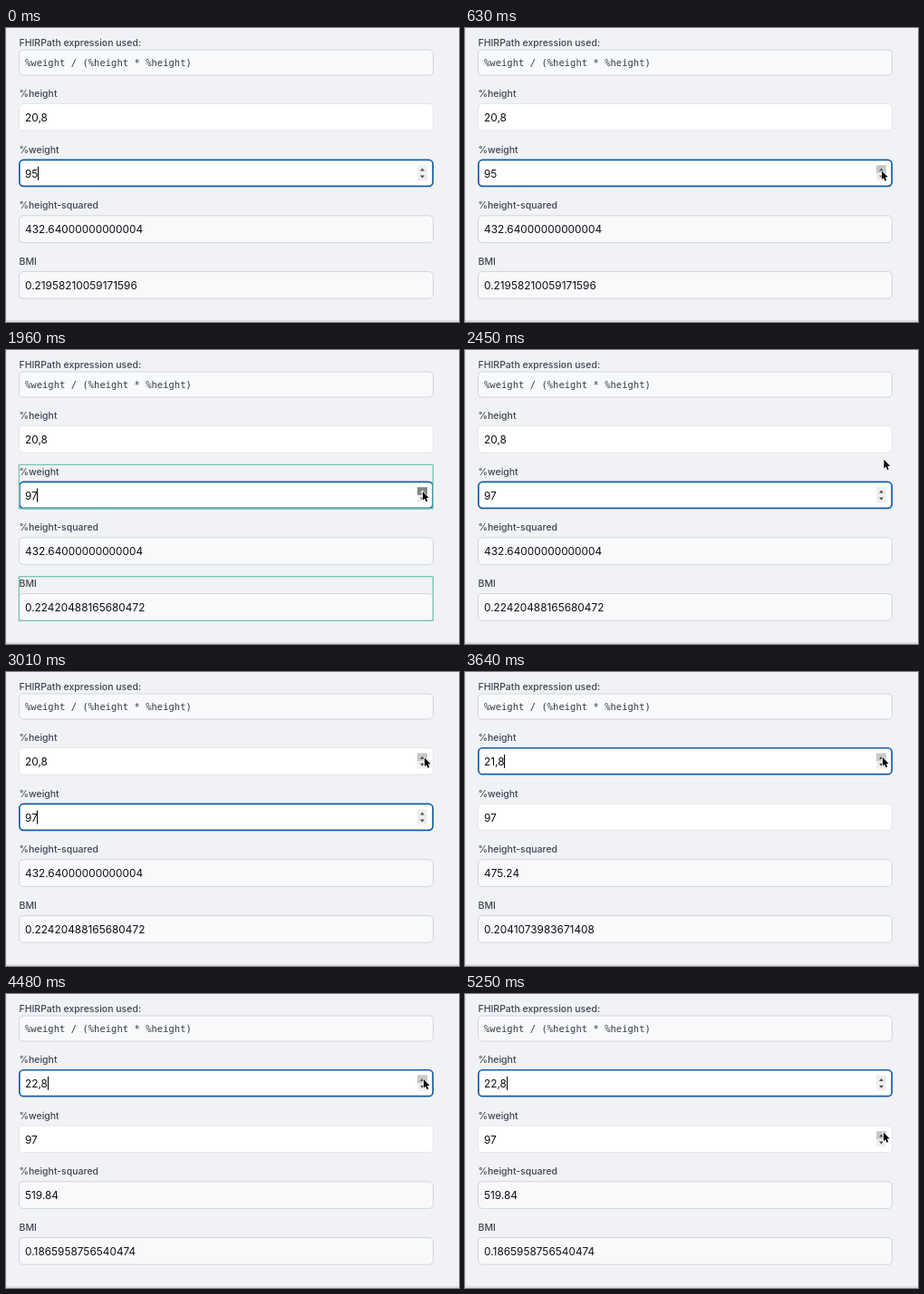
Animation of 500 by 324 pixels, one loop 5.32 s. Source, as an HTML page with a canvas:

```html
<!DOCTYPE html>
<html lang="en">
<head>
<meta charset="utf-8">
<title>BMI form</title>
<style>
  html, body { margin: 0; width: 100%; height: 100%; overflow: hidden; background: #f1f2f5; }
  canvas { display: block; width: 500px; height: 324px; }
</style>
</head>
<body>
<canvas id="stage"></canvas>
<script>
const W = 500, H = 324, LOOP = 5320, TICK = 70;
const LEFT = 14, WIDTH = 458, PITCH = 61.7, FIELD_H = 30.6;
const TEXT_FONT = '11.85px Inter, sans-serif';
const LABEL_FONT = '500 10.5px Inter, sans-serif';
const CODE_FONT = '10.54px "DejaVu Sans Mono", monospace';

const canvas = document.getElementById('stage');
const ctx = canvas.getContext('2d');
const dpr = window.devicePixelRatio || 1;
canvas.width = W * dpr;
canvas.height = H * dpr;

// Times at which the caret toggles; it starts visible.
const caretFlips = [210, 700, 1610, 1960, 2450, 2940, 3920, 4200, 4690, 5250];

// Render flashes: start, fade, end, and the rows that flash.
const flashes = [
  [1120, 1330, 1400, [1, 3]],
  [1960, 2240, 2310, [1, 3]],
  [3360, 3570, 3640, [0, 2, 3]],
  [4200, 4480, 4480, [0, 2, 3]]
];

// Pointer path: time, x, y
const path = [
  [70, 488, 276], [140, 477, 226], [210, 466, 181], [280, 461, 163],
  [420, 460, 160], [770, 460, 156], [2170, 460, 156], [2660, 464, 98],
  [2800, 464.5, 97], [3010, 462, 94.5], [3290, 462, 94.5], [3360, 461, 94],
  [4480, 461, 94], [4970, 462.5, 153.5], [5040, 462, 152.5]
];

const rowTop = row => 82.9 + row * PITCH;

function pointerAt(t) {
  if (t < path[0][0]) return null;
  for (let i = 1; i < path.length; i++) {
    const [t0, x0, y0] = path[i - 1], [t1, x1, y1] = path[i];
    if (t < t1) {
      let p = (t - t0) / (t1 - t0);
      p = p * p * (3 - 2 * p);
      return { x: x0 + (x1 - x0) * p, y: y0 + (y1 - y0) * p };
    }
  }
  const [, x, y] = path[path.length - 1];
  return { x, y };
}

function text(str, x, y, font, color) {
  ctx.font = font;
  ctx.fillStyle = color;
  ctx.fillText(str, x, y);
}

function box(y, h, fill, stroke, line) {
  ctx.beginPath();
  ctx.roundRect(LEFT + line / 2, y + line / 2, WIDTH - line, h - line, 4.5);
  ctx.fillStyle = fill;
  ctx.fill();
  ctx.strokeStyle = stroke;
  ctx.lineWidth = line;
  ctx.stroke();
}

function triangle(x, y, dir, color) {
  ctx.beginPath();
  ctx.moveTo(x - 2.4, y + 1.4 * dir);
  ctx.lineTo(x + 2.4, y + 1.4 * dir);
  ctx.lineTo(x, y - 1.6 * dir);
  ctx.fillStyle = color;
  ctx.fill();
}

function spinner(row, mouse, pressed) {
  const x = 454, y = rowTop(row) + 6.6, w = 11, h = 17.2, half = h / 2;
  ctx.fillStyle = '#efefef';
  ctx.fillRect(x, y, w, h);
  const over = mouse && mouse.x >= x && mouse.x <= x + w && mouse.y >= y && mouse.y <= y + h;
  const upper = over && mouse.y < y + half;
  if (over) {
    ctx.fillStyle = pressed ? '#858585' : '#c8c8c8';
    ctx.fillRect(x, upper ? y : y + half, w, half);
  }
  triangle(x + w / 2, y + 5, 1, pressed && upper ? '#f4f4f4' : '#4c4c4c');
  triangle(x + w / 2, y + 12.6, -1, '#4c4c4c');
}

function label(str, row) {
  text(str, LEFT + 0.5, rowTop(row) - 7, LABEL_FONT, '#3d4653');
}

function inputRow(row, value, focused, mouse, caret, pressed) {
  const y = rowTop(row);
  box(y, FIELD_H, '#fff', focused ? '#155ca8' : '#e4e6ea', focused ? 1.7 : 1);
  text(value, 21, y + 20, TEXT_FONT, '#0b0d12');
  if (focused && caret) {
    const x = 21 + ctx.measureText(value).width;
    ctx.fillStyle = '#000';
    ctx.fillRect(Math.round(x - 0.4), y + 8, 1, 15);
  }
  const hovered = mouse && mouse.x < LEFT + WIDTH && mouse.y >= y && mouse.y <= y + FIELD_H;
  if (focused || hovered) spinner(row, mouse, pressed);
}

function resultRow(row, value) {
  box(rowTop(row), FIELD_H, '#f8f9fb', '#d3d6db', 1);
  text(value, 21, rowTop(row) + 20, TEXT_FONT, '#0b0d12');
}

function drawFlashes(t) {
  for (const [start, fade, end, rows] of flashes) {
    if (t < start || t >= end) continue;
    ctx.globalAlpha = t < fade ? 1 : 0.45;
    ctx.strokeStyle = '#78c3b6';
    ctx.lineWidth = 1.3;
    for (const row of rows) ctx.strokeRect(14.4, rowTop(row) - 18.3, 456.9, 48.6);
    ctx.globalAlpha = 1;
  }
}

function drawPointer({ x, y }) {
  const shape = [[0, 0], [0, 9.6], [2.1, 7.7], [3.7, 11.3], [5.3, 10.6], [3.8, 7.1], [6.7, 6.9]];
  ctx.beginPath();
  shape.forEach(([dx, dy]) => ctx.lineTo(x + dx, y + dy));
  ctx.closePath();
  ctx.lineJoin = 'round';
  ctx.strokeStyle = '#fff';
  ctx.lineWidth = 1.4;
  ctx.stroke();
  ctx.fillStyle = '#000';
  ctx.fill();
}

function draw(t) {
  const height = t < 3360 ? 20.8 : t < 4200 ? 21.8 : 22.8;
  const weight = t < 1120 ? 95 : t < 1960 ? 96 : 97;
  const squared = height * height;
  const caret = caretFlips.filter(flip => flip <= t).length % 2 === 0;
  const pressed = t >= 1960 && t < 2030;
  const heightFocus = t >= 3360;
  const mouse = pointerAt(t);

  ctx.setTransform(dpr, 0, 0, dpr, 0, 0);
  ctx.fillStyle = '#f1f2f5';
  ctx.fillRect(0, 0, W, H);
  ctx.fillStyle = '#e0e2e5';
  ctx.fillRect(0, 0, 1, H);
  ctx.fillStyle = '#c6c8cb';
  ctx.fillRect(0, 322.5, W, 1);

  text('FHIRPath expression used:', LEFT + 0.5, 20, LABEL_FONT, '#3d4653');
  box(23.5, 29, '#f8f9fb', '#d3d6db', 1);
  text('%weight / (%height * %height)', 21, 41.7, CODE_FONT, '#363d49');

  ['%height', '%weight', '%height-squared', 'BMI'].forEach(label);
  inputRow(0, height.toFixed(1).replace('.', ','), heightFocus, mouse, caret, pressed);
  inputRow(1, String(weight), !heightFocus, mouse, caret, pressed);
  resultRow(2, String(squared));
  resultRow(3, String(weight / squared));

  drawFlashes(t);
  if (mouse) drawPointer(mouse);
}

const begin = performance.now();
function frame() {
  const t = (performance.now() - begin) % LOOP;
  draw(Math.floor(t / TICK) * TICK);
  requestAnimationFrame(frame);
}
frame();
</script>
</body>
</html>
```
